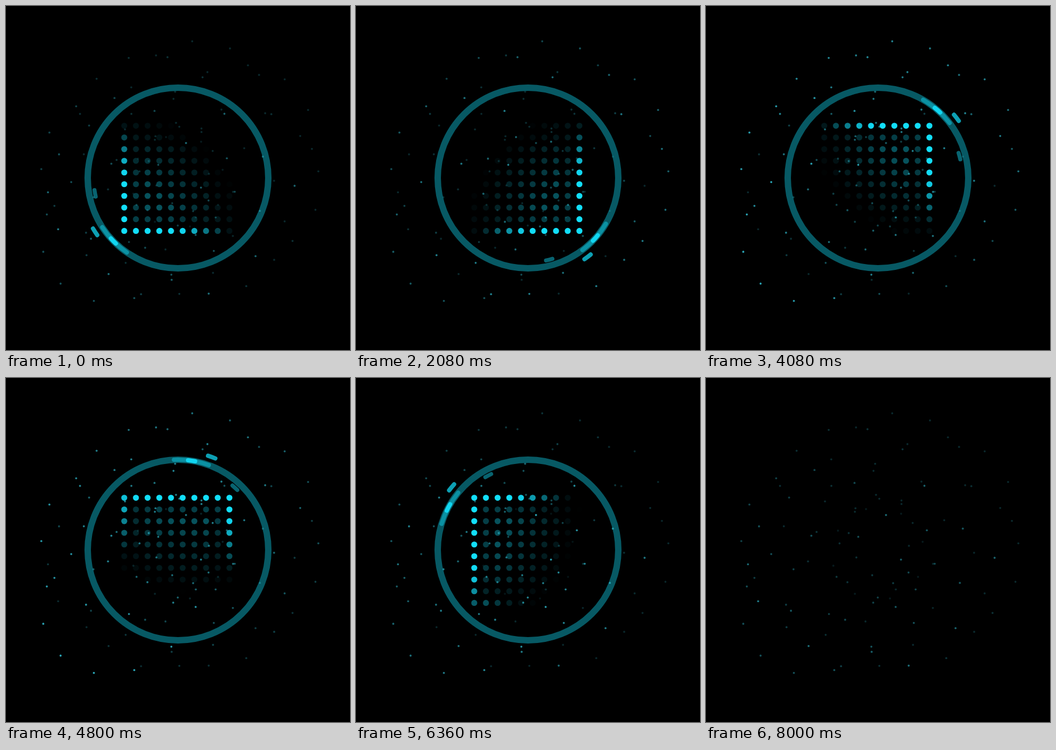
Recreate the animation shown at these times as an HTML page with a canvas. Size 640 by 640 pixels, loop 8040 ms.

```html
<!DOCTYPE html>
<html>
<head>
<meta charset="utf-8">
<style>
html, body { margin: 0; width: 100%; height: 100%; overflow: hidden; background: #000; }
canvas { display: block; }
</style>
</head>
<body>
<canvas id="stage" width="640" height="640"></canvas>
<script>
const ctx = document.getElementById('stage').getContext('2d');
const LOOP = 8040, SHOWN = 8000, TURN = 7960;
const C = 320, RAD = Math.PI / 180;
const cos = deg => Math.cos(deg * RAD), sin = deg => Math.sin(deg * RAD);
const clamp = v => Math.max(0, Math.min(1, v));
const cyan = a => `rgba(18,222,250,${a})`;

// The star trail: a fast circle whose centre drifts slowly the other way,
// swinging in and out and starting further out than it ends.
function trailStar(n) {
  const lead = Math.exp(-((n / 17) ** 2));
  const swing = 6 * (n - 45);
  const out = 93 + 24 * cos(swing) + 46 * lead;
  const side = -6 - 22 * sin(swing) + 30 * lead;
  const drift = 134 + 4.4 * n, spin = 165.8 - 28.83 * n;
  const u = ((n + 4) % 11.55) / 11.55;
  return {
    x: C + out * cos(drift) - side * sin(drift) + 157.5 * cos(spin),
    y: C + out * sin(drift) + side * cos(drift) + 157.5 * sin(spin),
    peak: 3.3 - 0.018 * n + u * (3 + 0.035 * n),
    base: 0.2 + 0.2 * lead
  };
}

const stars = [];
for (let n = -4; n < 96; n++) stars.push(trailStar(n));
// A small ring of stars around the middle.
for (let k = 0; k < 8; k++) {
  const a = 30 + 45 * k;
  stars.push({ x: C + 86 * cos(a), y: 327 + 86 * sin(a), peak: 2.6, base: 0.1 });
}

function disc(x, y, r, fill) {
  ctx.fillStyle = fill;
  ctx.beginPath();
  ctx.arc(x, y, r, 0, 2 * Math.PI);
  ctx.fill();
}

function arc(r, mid, half, width, alpha) {
  ctx.strokeStyle = cyan(alpha);
  ctx.lineWidth = width;
  ctx.beginPath();
  ctx.arc(C, C, r, (mid - half) * RAD, (mid + half) * RAD);
  if (half === 180) ctx.closePath();
  ctx.stroke();
}

// A side of the grid goes out once the head is well past it.
function sideLight(head, side) {
  const rel = ((head - side + 180) % 360 + 360) % 360 - 180;
  return clamp((105 - rel) / 15);
}

function drawGrid(head) {
  const hx = C + 168 * cos(head), hy = C - 168 * sin(head);
  const [right, top, left, bottom] = [0, 90, 180, 270].map(s => sideLight(head, s));
  for (let row = 0; row < 10; row++) {
    for (let col = 0; col < 10; col++) {
      const x = 220 + 21.74 * col, y = 222.8 + 21.74 * row;
      const d = Math.hypot(x - hx, y - hy);
      const depth = Math.min(row, col, 9 - row, 9 - col);
      let a = 0.37 * clamp((245 - d) / 130);
      if (depth === 1) a *= 0.75;
      if (depth === 0) {
        const lit = Math.min(col === 0 ? left : 1, col === 9 ? right : 1,
                             row === 0 ? top : 1, row === 9 ? bottom : 1);
        a += 0.63 * lit * clamp((215 - d) / 80);
      }
      disc(x, y, 5.6, cyan(a));
    }
  }
}

function draw(now) {
  const t = now % LOOP;
  ctx.fillStyle = '#000';
  ctx.fillRect(0, 0, 640, 640);

  if (t < SHOWN) {
    const head = 224.2 + 360 * t / TURN;
    drawGrid(head);
    ctx.lineCap = 'round';
    arc(168, 0, 180, 12, 0.4);
    arc(168, -head, 11.25, 8, 0.42);
    arc(168, -head, 2.25, 8, 0.9);
    arc(184, 11.25 - head, 2.25, 8, 0.72);
    arc(157, 33.75 - head, 2.25, 7.5, 0.45);
  }

  for (const s of stars) {
    const wave = (1 + Math.cos((t / 1000 - s.peak) * Math.PI / 4)) / 2;
    disc(s.x, s.y, 1.9, `rgba(50,195,215,${s.base + 0.45 * wave ** 2})`);
  }
}

const start = performance.now();
(function tick() {
  draw(performance.now() - start);
  requestAnimationFrame(tick);
})();
</script>
</body>
</html>
```
